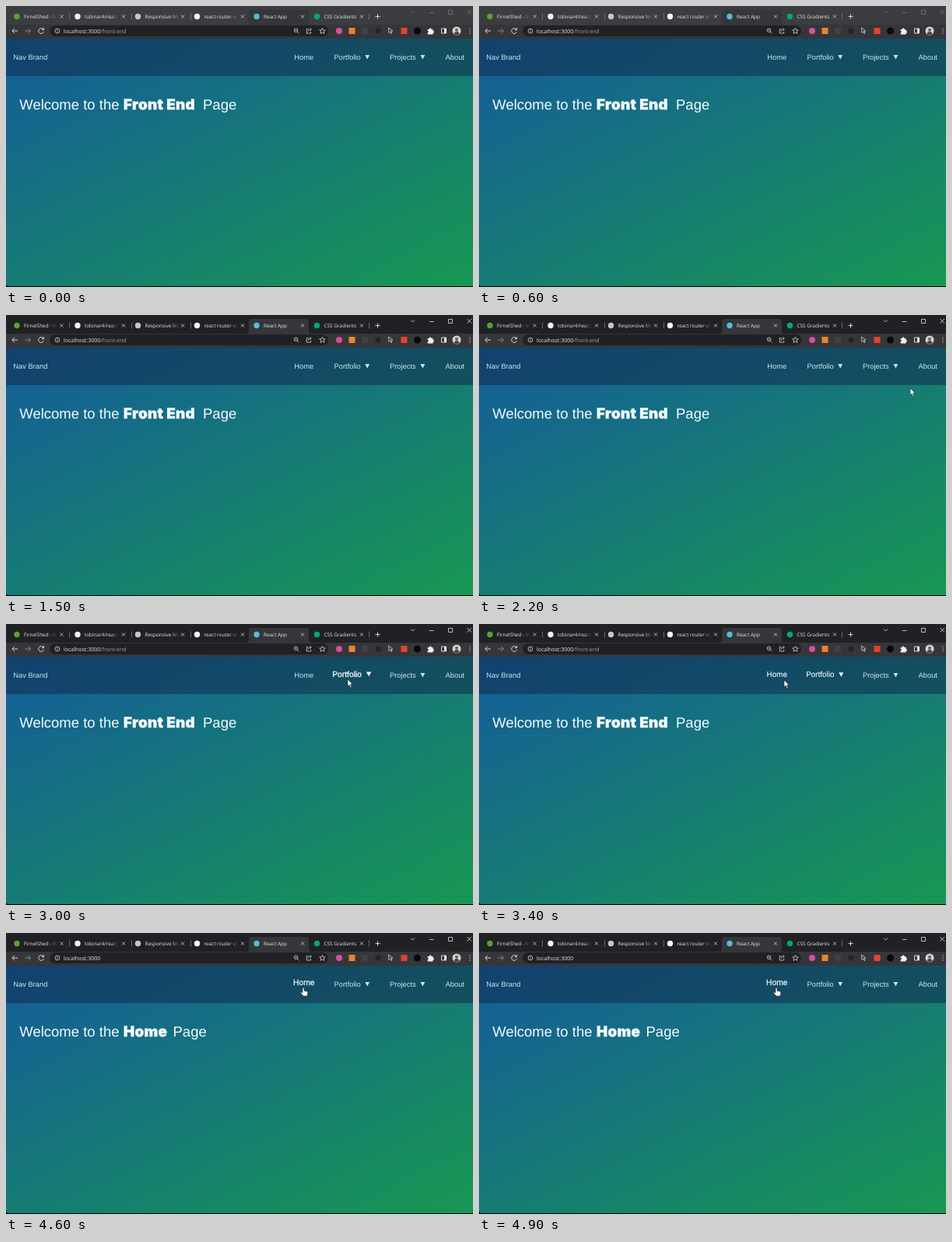
Write an HTML page that moves like this. It is 600x361 px and loops after 5000 ms.

```html
<!DOCTYPE html>
<html lang="en">
<head>
<meta charset="utf-8">
<title>React App</title>
<style>
html, body { margin: 0; width: 100%; height: 100%; overflow: hidden; background: #000; }
svg { display: block; width: 600px; height: 361px; }
text { white-space: pre; text-rendering: geometricPrecision; }
.ui { font: 6.4px "Open Sans", "Noto Sans", sans-serif; fill: #e6e8eb; }
.url { font-size: 7px; }
.page { font: 9.35px "Liberation Sans", Arial, sans-serif; fill: #c3e9ef; }
.title { font-size: 18.5px; fill: #f4fbfd; }
.black { font: 900 18.8px Inter, "Liberation Sans", sans-serif; letter-spacing: .3px; stroke: #f4fbfd; stroke-width: .4px; }
.line { fill: none; stroke: #d5d7da; }
.dim { stroke: #85878b; }
</style>
</head>
<body>
<svg viewBox="0 0 600 361">
  <defs>
    <linearGradient id="sky" gradientUnits="userSpaceOnUse" x1="158" y1="-95" x2="442" y2="497">
      <stop offset=".09" stop-color="#145c9a"/><stop offset=".91" stop-color="#189752"/>
    </linearGradient>
    <linearGradient id="fade">
      <stop offset=".75" stop-color="#e6e8eb"/><stop offset=".98" stop-color="#e6e8eb" stop-opacity="0"/>
    </linearGradient>
  </defs>

  <rect id="strip" width="600" height="26"/>
  <path d="M309 24q3 0 3-3V9q0-4 4-4h69q4 0 4 4v12q0 3 3 3H600V42H0V24z" fill="#35363a"/>
  <g id="tabs"></g>
  <path class="line" d="M477.500 10.500v6M474.500 13.500h6"/>
  <g id="controls" class="line" stroke-width=".8">
    <path d="M520 6.500l2.500 2.500 2.500-2.500M544 8.500h5.500M568.500 5.500h5v5h-5zM592.500 5l5.500 5.500M598 5l-5.500 5.500"/>
  </g>

  <rect x="56" y="25" width="358" height="14" rx="7" fill="#202124"/>
  <path class="line" d="M15 32H8M11 28.800L7.800 32l3.200 3.200M48 30a3.400 3.400 0 1 0 .4 3.200M48.500 28.200v2.500H46"/>
  <path class="line dim" d="M24.500 32h7M28.300 28.800l3.200 3.200-3.200 3.200"/>
  <g class="line" stroke-width=".8">
    <circle cx="66" cy="32" r="2.900"/><path d="M66 31.500v2M66 30v.7"/>
    <circle cx="372.500" cy="31.300" r="2.300"/><path d="M374.200 33l2.200 2.200M371.400 31.300h2.200"/>
    <path d="M388.500 29.500h-2.200v5.500h5.400v-2M388 32.800q.4-2.800 4-2.800M390.500 28.300l1.800 1.700-1.800 1.700"/>
    <path d="M406.500 28.300l1.100 2.500 2.700.2-2.100 1.700.7 2.700-2.400-1.500-2.400 1.500.7-2.700-2.100-1.700 2.700-.2z"/>
  </g>
  <text class="ui url" x="74" y="34.500">localhost:3000<tspan id="path" fill="#a0a4a9"></tspan></text>
  <g id="extensions"></g>
  <path d="M491.500 28l.5 6.500 1.600-1.600 1.400 2.600 1-.6-1.300-2.500 2.200-.4z" class="line" stroke-width=".8"/>
  <path d="M541.700 30h2a1.400 1.400 0 0 1 2.800 0h2v2a1.400 1.400 0 0 1 0 2.800v1.700h-6.800v-2.200a1.200 1.200 0 0 0 0-2.400z" fill="#f0f1f2"/>
  <path d="M559.500 29h6v6h-6z" class="line"/><path d="M563 29h2.500v6H563z" fill="#e5e6e8"/>
  <circle cx="579" cy="32" r="5.500" fill="#d8d4d0"/>
  <path d="M575.500 36q.5-3 3.500-3t3.500 3q-3.500 2.500-7 0z" fill="#4a4650"/>
  <circle cx="579" cy="30.800" r="2.100" fill="#7a5f55"/>
  <path d="M596 28.500v1.300M596 31.400v1.300M596 34.300v1.300" class="line"/>

  <path d="M0 42H600V360H2L0 358z" fill="url(#sky)"/>
  <rect y="42" width="600" height="48" fill="#112d4e" fill-opacity=".55"/>
  <text class="page" x="9.300" y="68.500">Nav Brand</text>
  <g id="nav"></g>
  <text class="page title" x="17.300" y="133">Welcome to the</text>
  <text class="page title black" id="name" x="151" y="133"></text>
  <text class="page title" id="word" y="133">Page</text>

  <g id="cursor" stroke="#222" stroke-width=".6" stroke-linejoin="round">
    <path id="arrow" fill="#fff" d="M0 0v9l2-1.900 1.500 3.300 1.500-.7-1.500-3.200h2.800z"/>
    <path id="hand" fill="#fff" d="M-1 1q1-2 2 0v3.200l4 .9q1 .4.800 1.600l-.8 4.300H0L-3.400 7q-.3-1.600 1-1.200L-1 7z"/>
  </g>
</svg>
<script>
const $ = id => document.getElementById(id);

// icon x, icon colour, label, close x, separator x
const tabs = [
  [14, '#55a62c', 'FirnelShed - W', 71.5, 81.5],
  [92, '#f1f1f1', 'tobinar4/react-', 151, 161.5],
  [169.5, '#c4c7ca', 'Responsive Me', 227, 237.5],
  [245.5, '#f4f4f4', 'react router v6', 304, 0],
  [322, '#4fbfdc', 'React App', 381, 0],
  [399.5, '#07a86b', 'CSS Gradients', 457, 466.5],
];
$('tabs').innerHTML = tabs.map(([x, color, label, close, bar], i) => `
  <circle cx="${x}" cy="13.500" r="3.700" fill="${color}"/>
  <text class="ui" x="${x + 9}" y="15.800"${i < 4 ? ' style="fill:url(#fade)"' : ''}>${label}</text>
  <path class="line" stroke-width=".8" d="M${close - 2} 11.500l4 4m0-4l-4 4"/>
  ${bar ? `<path class="line dim" stroke-width=".7" d="M${bar} 9.500v8"/>` : ''}`).join('');

const extensions = [
  [428, '#d64f9b', 4], [444.5, '#e8852e', 0], [461, '#404145', 0],
  [478, '#222327', 3.5], [511.5, '#e2432e', 0], [528.5, '#090909', 4.5],
];
$('extensions').innerHTML = extensions.map(([x, color, r]) => r
  ? `<circle cx="${x}" cy="32" r="${r}" fill="${color}"/>`
  : `<rect x="${x - 4}" y="28" width="8" height="8" fill="${color}"/>`).join('');

// label, left edge, middle
const links = [['Home', 370.3, 383.1], ['Portfolio', 421.5, 444.3], ['Projects', 493, 515.5], ['About', 564.5, 577]];
$('nav').innerHTML = links.map(([label, x, mid], i) => `<g id="${label}" class="page">
  <text x="${x}" y="68.500">${label}</text>
  ${i % 3 ? `<path d="M${mid + 17} 63h5.800l-2.900 5.400z" stroke="none"/>` : ''}</g>`).join('');

// time, x, y
const route = [
  [1900, 598, 50], [2000, 585, 62], [2200, 554, 94], [2400, 546, 143], [2500, 525, 152],
  [2700, 475, 123], [2850, 447, 82], [3000, 439, 71], [3200, 416, 71], [3400, 392, 72], [3600, 382, 70],
];

function cursorAt(t) {
  const i = route.findIndex(p => p[0] > t);
  if (i < 0) return route[route.length - 1].slice(1);
  const [t0, x0, y0] = route[i - 1], [t1, x1, y1] = route[i];
  const k = (t - t0) / (t1 - t0);
  return [x0 + (x1 - x0) * k, y0 + (y1 - y0) * k];
}

const ramp = (t, start, length) => {
  const k = Math.min(1, Math.max(0, (t - start) / length));
  return k * k * (3 - 2 * k);
};

function hover(index, k, peak = [255, 255, 255]) {
  const [id, , mid] = links[index], base = [195, 233, 239];
  const color = `rgb(${base.map((c, i) => Math.round(c + (peak[i] - c) * k))})`;
  const link = $(id);
  link.setAttribute('transform', `translate(${mid} ${65 - 1.4 * k}) scale(${1 + .11 * k}) translate(${-mid} -65)`);
  link.style.fill = link.style.stroke = color;
  link.style.strokeWidth = .3 * k;
}

function draw(now) {
  const t = Math.floor(now % 5000 / 100) * 100;
  const focused = t >= 1500, home = t >= 4500, hand = t >= 3600;

  $('strip').setAttribute('fill', focused ? '#202124' : '#3c3d40');
  $('controls').style.stroke = focused ? '#dfe1e5' : '#77797c';
  $('path').textContent = home ? '' : '/front-end';
  $('name').textContent = home ? 'Home' : 'Front End';
  $('word').setAttribute('x', home ? 214.5 : 253);

  hover(0, ramp(t, 3250, 300), home ? [220, 237, 243] : undefined);
  hover(1, ramp(t, 2800, 250) - ramp(t, 3250, 300));

  const visible = t >= 1900;
  $('cursor').style.display = visible ? '' : 'none';
  if (visible) $('cursor').setAttribute('transform', `translate(${cursorAt(t)})`);
  $('arrow').style.display = hand ? 'none' : '';
  $('hand').style.display = hand ? '' : 'none';
}

const start = performance.now();
function tick() {
  draw(performance.now() - start);
  requestAnimationFrame(tick);
}
tick();
</script>
</body>
</html>
```
